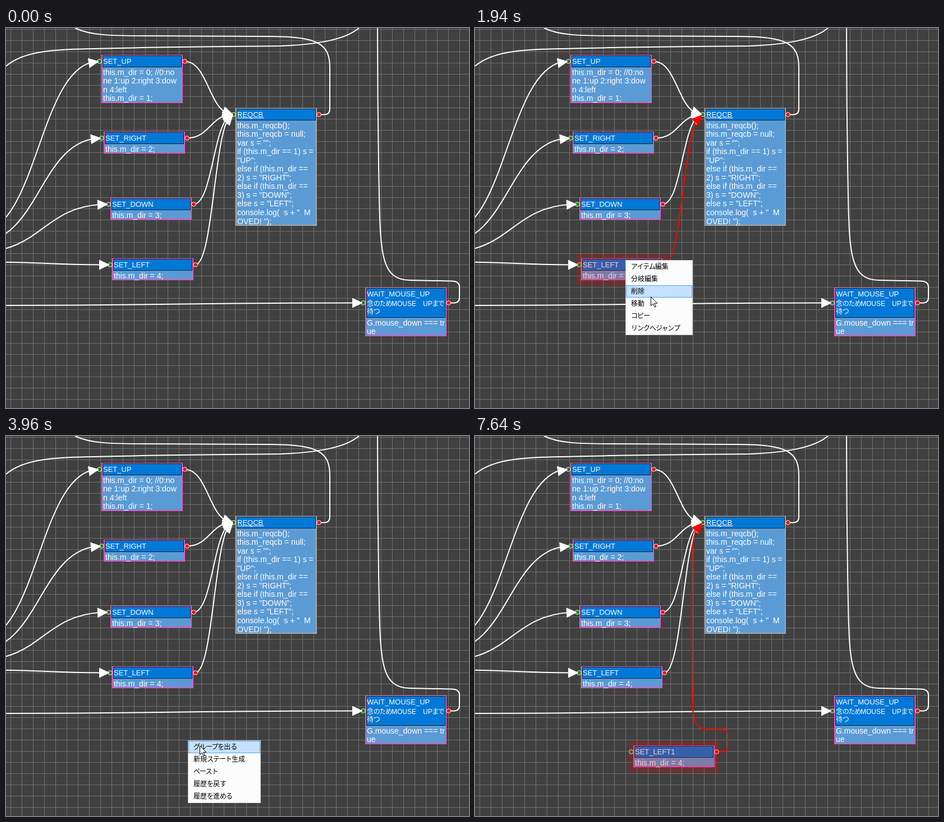
Write an HTML page that moves like this. It is 825x678 px and loops after 7760 ms.

```html
<!DOCTYPE html>
<html lang="ja">
<head>
<meta charset="utf-8">
<title>State chart: copy and paste</title>
<style>
html, body { margin: 0; width: 100%; height: 100%; overflow: hidden; background: #404040; }
svg { display: block; }
text { font: 14px "Liberation Sans", "Noto Sans CJK JP", "Noto Sans CJK", sans-serif; fill: #fff; white-space: pre; font-feature-settings: "palt"; }
.title { font-size: 13px; }
.note { font-size: 12px; }
.menu text { font: 12px "Noto Sans CJK JP", "Noto Sans CJK", sans-serif; fill: #000; }
.kana { letter-spacing: -1px; }
.link { fill: none; stroke: #fff; stroke-width: 2; }
.head { fill: #fff; }
.red .link, .link.red { stroke: #f00; }
.red .head, .head.red { fill: #f00; }
</style>
</head>
<body>
<svg width="825" height="678" viewBox="0 0 825 678">
  <defs>
    <pattern id="grid" width="20" height="20" patternUnits="userSpaceOnUse">
      <path d="M8.5 0V20M0 2.5H20" stroke="#707070"/>
    </pattern>
  </defs>
  <rect width="825" height="678" fill="#404040"/>
  <rect width="825" height="678" fill="url(#grid)"/>
  <g id="links"></g>
  <g id="nodes"></g>
  <g id="heads"></g>
  <g id="pasted"></g>
  <rect id="halo" width="162" height="57" fill="#f00" opacity=".2"/>
  <g id="menus"></g>
  <path id="cursor" d="M.5.5V16.5L4.2 13L7 19L9.4 18L6.6 12.2H11.8Z" fill="#fff" stroke="#000"/>
</svg>
<script>
const $ = id => document.getElementById(id);
const add = (parent, html) => {
  parent.insertAdjacentHTML('beforeend', html);
  return parent.lastElementChild;
};
const show = (el, on) => el.style.display = on ? '' : 'none';
const text = (x, y, s, cls = '') => `<text x="${x}" y="${y}" class="${cls}">` +
  s.replace(/[ぁ-んァ-ヶー]+/g, '<tspan class="kana">$&</tspan>') + '</text>';

// A state box: title bar (with optional note lines), code lines and two ports.
function node(parent, x, y, h, title, code, { note = [], border = '#e058c0', underline } = {}) {
  const bar = note.length ? 54 : 22, mid = y + bar / 2;
  const port = (px, color) =>
    `<circle cx="${px}" cy="${mid + .5}" r="3.8" fill="${color}" stroke="#fff"/>`;
  add(parent, `<g>
    <rect x="${x + 1}" y="${y + 1}" width="143" height="${h - 2}" fill="#5b9bd5" stroke="${border}" stroke-width="2"/>
    <rect x="${x + 2.5}" y="${y + 1.5}" width="140" height="${bar - 2}" fill="#0078d7" stroke="#152030"/>
    ${text(x + 3, y + 16, title, 'title')}
    ${underline ? `<path d="M${x + 3} ${y + 17.5}h48" stroke="#fff"/>` : ''}
    ${note.map((s, i) => text(x + 3, y + 32.5 + 14 * i, s, 'note')).join('')}
    ${code.map((s, i) => text(x + 3, y + bar + 13.5 + 15.55 * i, s)).join('')}
    ${port(x - 3.5, '#008000')}${port(x + 148.5, '#f00')}</g>`);
}

// A connection; the arrowhead points along the chord of its last 18 pixels.
function link(lines, heads, d, arrow = true) {
  const line = add(lines, `<path class="link" d="${d}"/>`);
  if (!arrow) return [line];
  const len = line.getTotalLength();
  const tip = line.getPointAtLength(len), base = line.getPointAtLength(len - 18);
  const angle = Math.atan2(tip.y - base.y, tip.x - base.x) * 180 / Math.PI;
  line.setAttribute('stroke-dasharray', `${len - 12} 99`);
  return [line, add(heads, `<path class="head" d="M0 0L-19-9V9Z"
    transform="translate(${tip.x} ${tip.y}) rotate(${angle})"/>`)];
}

const links = $('links'), nodes = $('nodes'), heads = $('heads'), pasted = $('pasted');
const join = (x0, y0, x1, y1) => {
  const m = (x0 + x1) / 2;
  return link(links, heads, `M${x0} ${y0}C${m} ${y0} ${m} ${y1} ${x1} ${y1}`);
};
const loop = d => link(links, heads, d, false);

join(-50, 365, 166, 59.5);
join(-50, 382.4, 170, 196.5);
join(-50, 399.8, 182, 314.5);
join(-50, 417.2, 185, 422.5);
join(-50, 495, 636, 490.5);
loop('M557 154.500h10q10 0 10-10V70C577 28 555 15 470 15L250 14C185 14 150 13 123 0');
loop('M0 68C35 38 90 38 200 36C300 33 400 33 490 32C560 29 605 20 629 0');
loop('M788 490.500h10q10 0 10-10v-18q0-11-14-11L720 450C670 450 667 405 665 300Q662 150 662 0');
join(318, 59.5, 405, 154.5);
join(322, 196.5, 405, 154.5);
join(334, 314.5, 405, 154.5);
const leftLink = join(337, 422.5, 405, 154.5);

node(nodes, 170, 48, 86, 'SET_UP',
  ['this.m_dir = 0; //0:no', 'ne 1:up 2:right 3:dow', 'n 4:left', 'this.m_dir = 1;']);
node(nodes, 174, 185, 39, 'SET_RIGHT', ['this.m_dir = 2;']);
node(nodes, 186, 303, 39, 'SET_DOWN', ['this.m_dir = 3;']);
node(nodes, 189, 411, 39, 'SET_LEFT', ['this.m_dir = 4;']);
node(nodes, 409, 143, 210, 'REQCB', [
  'this.m_reqcb();', 'this.m_reqcb = null;', 'var s = "";',
  'if (this.m_dir == 1) s =', '"UP";', 'else if (this.m_dir ==', '2) s = "RIGHT";',
  'else if (this.m_dir ==', '3) s = "DOWN";', 'else s = "LEFT";',
  'console.log(  s + "  M', 'OVED! ");'
], { border: '#a5a5a0', underline: true });
node(nodes, 640, 463, 87, 'WAIT_MOUSE_UP', ['G.mouse_down === tr', 'ue'],
  { note: ['念のためMOUSE　UPまで', '待つ'] });

pasted.classList.add('red');
const pastedLine = add(pasted, '<g></g>');
link(pastedLine, pasted, 'M430 563.500h10q10 0 10-10v-20q0-10-10-10h-26' +
  'C393 523 388 510 387.500 470C385 410 385 270 387 205C389 178 394 158 405 154.500');
node(pasted, 282, 552, 39, 'SET_LEFT1', ['this.m_dir = 4;']);

function menu(x, y, w, items, from, to) {
  const h = items.length * 22 + 2;
  const el = add($('menus'), `<g class="menu">
    <rect x="${x + .5}" y="${y + .5}" width="${w - 1}" height="${h - 1}" fill="#fcfcfc" stroke="#ccc"/>
    <rect class="hover" x="${x + 1.5}" width="${w - 3}" height="21" fill="#c4e1ff" stroke="#5aa5e0"/>
    ${items.map((s, i) => text(x + 10, y + 16 + 22 * i, s)).join('')}</g>`);
  const hover = el.querySelector('.hover');
  return (t, cy) => {
    const i = Math.floor((cy - y - 1) / 22);
    show(el, t >= from && t < to);
    show(hover, i >= 0 && i < items.length);
    hover.setAttribute('y', y + 1.5 + 22 * i);
  };
}
const menus = [
  menu(268, 414, 120, ['アイテム編集', '分岐編集', '削除', '移動', 'コピー', 'リンクへジャンプ'], 1630, 2770),
  menu(324, 543, 130, ['グループを出る', '新規ステート生成', 'ペースト', '履歴を戻す', '履歴を進める'], 3840, 4960)
];

// Pointer track: time, x, y
const track = [
  [100, 554, 618], [810, 276, 425], [880, 276, 425], [1150, 286, 423], [1400, 286, 423],
  [1570, 268, 413], [1680, 272, 418], [1940, 313, 479], [2080, 318, 488], [2260, 318, 489],
  [2520, 320, 509], [2900, 320, 510], [3530, 421, 582], [3620, 421, 582], [3790, 323, 543],
  [3840, 323, 543], [3960, 345, 552], [4340, 352, 577], [4420, 354, 579], [4600, 372, 602],
  [4960, 374, 602], [5140, 387, 600], [6270, 387, 600], [6460, 484, 627]
];
function pointer(t) {
  let i = track.findIndex(k => k[0] > t);
  if (i < 1) i = i < 0 ? track.length - 1 : 1;
  const [t0, x0, y0] = track[i - 1], [t1, x1, y1] = track[i];
  const p = Math.min(1, Math.max(0, (t - t0) / (t1 - t0)));
  return [x0 + (x1 - x0) * p, y0 + (y1 - y0) * p].map(Math.round);
}

function draw(now) {
  const t = now % 7760;
  const [x, y] = pointer(t);
  const leftOn = t >= 880 && t < 3600, copyOn = t >= 5390;
  leftLink.forEach(el => el.classList.toggle('red', leftOn));
  show(pasted, copyOn);
  show($('halo'), leftOn || copyOn);
  $('halo').setAttribute('x', copyOn ? 273 : 180);
  $('halo').setAttribute('y', copyOn ? 544 : 403);
  menus.forEach(update => update(t, y));
  show($('cursor'), t >= 100 && t < 6460);
  $('cursor').setAttribute('transform', `translate(${x} ${y})`);
}
const start = performance.now();
function frame() {
  draw(performance.now() - start);
  requestAnimationFrame(frame);
}
frame();
</script>
</body>
</html>
```
